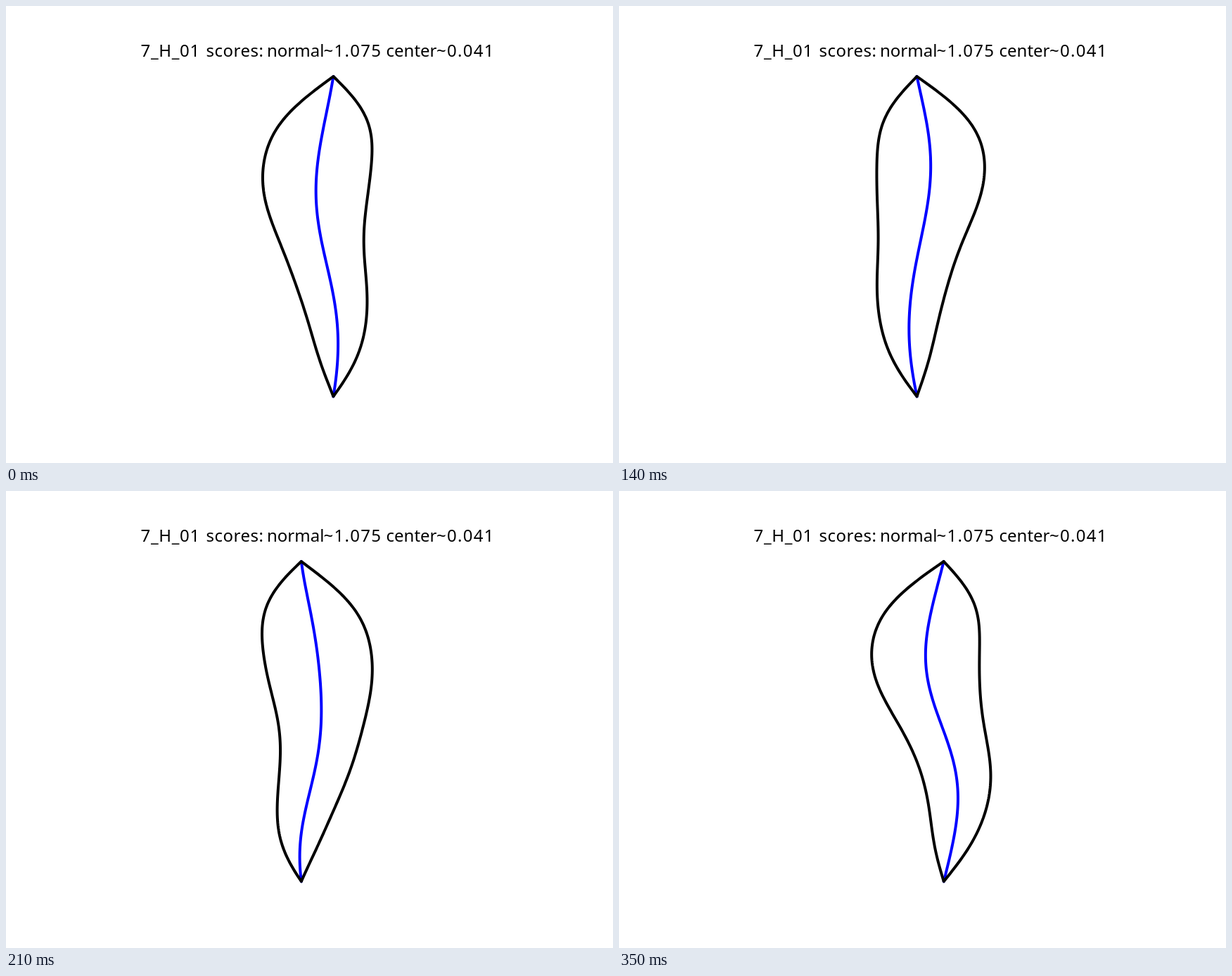
Write an HTML page that moves like this. It is 863x649 px and loops after 0.42 s.

```html
<!DOCTYPE html>
<html lang="en">
<head>
<meta charset="utf-8">
<title>Leaf outline</title>
<style>
  html, body { margin: 0; width: 100%; height: 100%; overflow: hidden; background: #fff; }
  svg { display: block; width: 100%; height: 100%; }
  path { fill: none; stroke-width: 4; stroke-linejoin: round; stroke-linecap: round; }
  #outline { stroke: #000; }
  #midline { stroke: #00f; }
  text { font: 24px "Noto Sans", "Open Sans", sans-serif; fill: #000; }
  .label { letter-spacing: 0.7px; }
  .wide { letter-spacing: 0.5px; }
  .number { letter-spacing: 1.3px; }
</style>
</head>
<body>
<svg viewBox="0 0 863 649">
  <text y="72"><tspan class="label" x="191.5">7_H_01 </tspan><tspan class="wide" x="284.5">scores: </tspan><tspan x="371">normal</tspan><tspan class="number" x="451.5">~1.075 </tspan><tspan x="540.5">center</tspan><tspan class="number" x="612">~0.041</tspan></text>
  <path id="midline"/>
  <path id="outline"/>
</svg>
<script>
const STEP = 70, POSES = 6;
const TOP = 100, BOTTOM = 554.5, CENTER = 445.2;
const SAMPLES = 120;

// Midline sway: amplitude, cycles along the body, cycles per loop, phase.
const WAVES = [
  [16.4, 0, 1, 0.815],
  [14.9, 1, -1, 0.466],
  [4.5, 1, 0, 1.91],
  [3.8, 1, 1, 2.045],
  [2.1, 0, 2, -1.45],
  [1.27, 1, -2, 3.79],
  [1.05, 2, 0, -1.86],
  [0.81, 2, 1, 0.52],
  [0.78, 2, -1, 2.97],
  [0.75, 1, -3, -1.57]
];

// Half width: sine series that vanishes at both tips.
const WIDTHS = [73.3, 17.2, 13, 1.9, 1.8, 0.6, 0.6];

const outline = document.getElementById("outline");
const midline = document.getElementById("midline");

const midX = (s, turn) => WAVES.reduce((x, [amp, along, loops, phase]) =>
  x + amp * Math.cos(2 * Math.PI * (along * s + loops * turn) + phase), CENTER);

const halfWidth = s => WIDTHS.reduce((w, amp, i) =>
  w + amp * Math.sin((i + 1) * Math.PI * s), 0);

const line = points => "M" + points.map(p => p.map(v => v.toFixed(2)).join(" ")).join("L");

function draw(time) {
  const turn = Math.floor(time / STEP) % POSES / POSES;
  const mid = [], left = [], right = [];
  for (let i = 0; i <= SAMPLES; i++) {
    const s = i / SAMPLES;
    const y = TOP + (BOTTOM - TOP) * s;
    const x = midX(s, turn);
    const w = halfWidth(s);
    mid.push([x, y]);
    left.push([x - w, y]);
    right.push([x + w, y]);
  }
  midline.setAttribute("d", line(mid));
  outline.setAttribute("d", line([...left, ...right.reverse()]) + "Z");
}

function tick() {
  draw(performance.now());
  requestAnimationFrame(tick);
}
tick();
</script>
</body>
</html>
```
